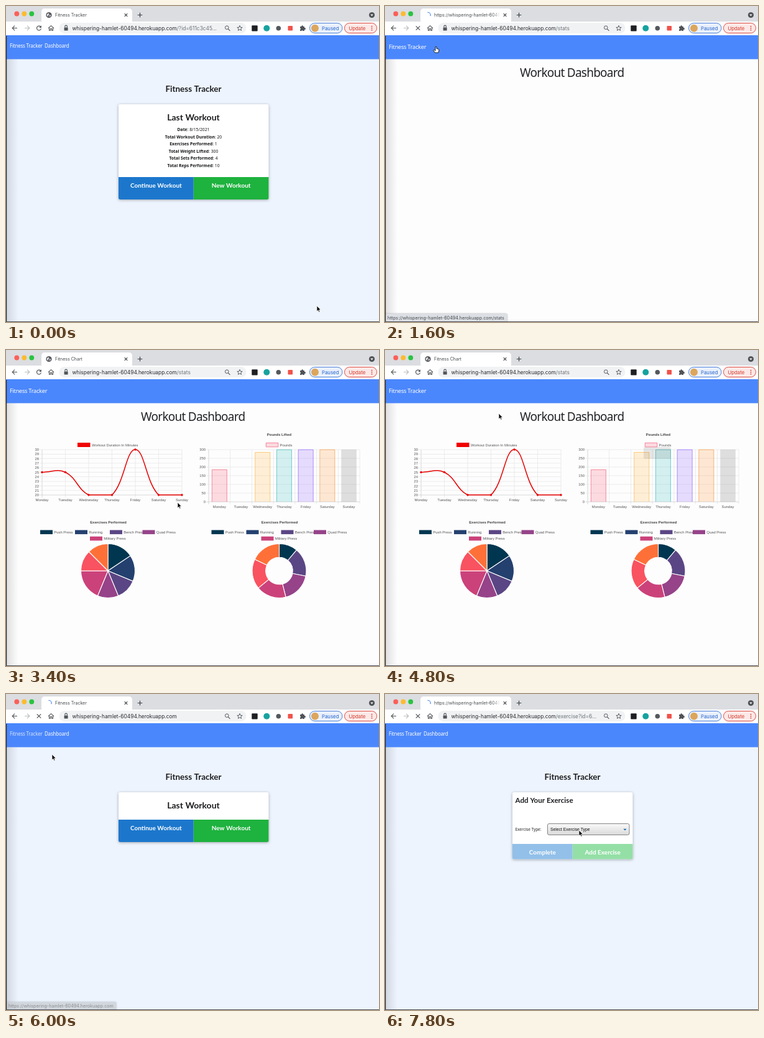
These frames come from a looping animation (600 by 508 pixels, 8000 ms). An HTML page with a canvas:

```html
<!DOCTYPE html>
<html lang="en">
<head>
<meta charset="utf-8">
<title>Fitness Tracker</title>
<style>
html, body { margin: 0; width: 100%; height: 100%; overflow: hidden; background: #fff; }
canvas { display: block; width: 600px; height: 508px; }
</style>
</head>
<body>
<canvas id="stage"></canvas>
<script>
const canvas = document.getElementById('stage');
const ratio = window.devicePixelRatio || 1;
canvas.width = 600 * ratio;
canvas.height = 508 * ratio;
const c = canvas.getContext('2d');
c.scale(ratio, ratio);

const LOOP = 8000, STEP = 200, TAU = Math.PI * 2;
const UI = 'Inter, sans-serif', LATO = 'Lato, sans-serif';
const BODY = '"Noto Sans", sans-serif', CHART = '"Liberation Sans", Arial, sans-serif';
const HOST = 'whispering-hamlet-60494.herokuapp.com';
const DAYS = ['Monday', 'Tuesday', 'Wednesday', 'Thursday', 'Friday', 'Saturday', 'Sunday'];
const MINUTES = [25, 25, 20, 20, 30, 20, 20];
const POUNDS = [185, 0, 285, 300, 300, 300, 300];
const PALETTE = ['#003650', '#24406f', '#5a4684', '#964389', '#cb427a', '#f95260', '#ff7038'];
const BARS = ['245,90,120', '54,162,235', '255,184,70', '60,185,185', '140,95,250', '250,150,60'];

// Cursor stops: time, x, y of the tip.
const PATH = [
  [0, 500, 482], [200, 500, 482], [1000, 85, 66], [1600, 82, 65], [2000, 36, 65], [2400, 36, 65],
  [3400, 276, 245], [3800, 175, 350], [4200, 440, 320], [4500, 440, 172], [4800, 183, 102],
  [5200, 36, 65], [5600, 36, 65], [6000, 74, 97], [6800, 242, 289], [7200, 242, 289], [7800, 312, 219]
];
// Links under the cursor: start, end, path shown in the status bubble.
const LINKS = [[1000, 1800, '/stats'], [2000, 2600, ''], [5200, 5800, ''], [6800, 7400, '/exercise?']];

function text(s, x, y, size, family, color, { align = 'left', weight = 400, spacing = 0 } = {}) {
  c.font = `${weight} ${size}px ${family}`;
  c.letterSpacing = spacing + 'px';
  c.textAlign = align;
  c.fillStyle = color;
  c.fillText(s, x, y + size * 0.36);
  return c.measureText(s).width;
}

function rect(x, y, w, h, color) {
  c.fillStyle = color;
  c.fillRect(x, y, w, h);
}

function box(x, y, w, h, r, fill, stroke, line = 1) {
  c.beginPath();
  c.roundRect(x, y, w, h, r);
  paint(fill, stroke, line);
}

function disc(x, y, r, fill, stroke, line = 1) {
  c.beginPath();
  c.arc(x, y, r, 0, TAU);
  paint(fill, stroke, line);
}

function paint(fill, stroke, line) {
  if (fill) { c.fillStyle = fill; c.fill(); }
  if (stroke) { c.strokeStyle = stroke; c.lineWidth = line; c.stroke(); }
}

function icon(d, x, y, fill, stroke, line = 1.1) {
  c.save();
  c.translate(x, y);
  const p = new Path2D(d);
  if (fill) { c.fillStyle = fill; c.fill(p); }
  if (stroke) { c.strokeStyle = stroke; c.lineWidth = line; c.stroke(p); }
  c.restore();
}

function drawBrowser(s) {
  const ink = '#505357';
  rect(0, 0, 600, 25, '#dbdde1');
  ['#fb5f57', '#fdbb2e', '#29c440'].forEach((color, i) => disc(17.3 + 12 * i, 12.5, 3.9, color));
  box(57, 4, 146, 24, 5, '#fff');
  if (s.loading) {
    c.beginPath();
    c.arc(69, 14.5, 4.2, -1.7, 0.4);
    paint(null, '#3f7ff0', 1.1);
  } else {
    disc(69, 14.5, 4.6, '#54575b');
    icon('M-3 -1.5L-.5 -3L.5 -1L-1 .3L-1 2.8L-3.3 .8Z M1.2 -.2L3.2 .2L1.8 3L.6 1.6Z', 69, 14.5, '#e6e8ea');
  }
  c.save();
  c.beginPath();
  c.rect(79, 5, 106, 20);
  c.clip();
  text(s.title, 79, 14.5, 7, UI, '#44474a');
  const fade = c.createLinearGradient(172, 0, 185, 0);
  fade.addColorStop(0, '#fff0');
  fade.addColorStop(1, '#fff');
  rect(172, 6, 13, 18, fade);
  c.restore();
  icon('M-2.3 -2.3L2.3 2.3M2.3 -2.3L-2.3 2.3', 193, 14.5, null, '#3c4043');
  icon('M-3.8 0H3.8M0 -3.8V3.8', 215.5, 14.5, null, '#3c4043', 1.2);
  disc(588.5, 14.5, 4.6, '#505357');
  icon('M-2.2 -1H2.2L0 1.7Z', 588.5, 14.5, '#fff');

  rect(0, 25, 600, 22, '#fff');
  const arrow = 'M4 0H-3.6M0 -3.8L-3.8 0L0 3.8';
  icon(arrow, 14, 35.5, null, ink);
  icon('M-4 0H3.6M0 -3.8L3.8 0L0 3.8', 34, 35.5, null, '#b9bcc0');
  if (s.loading) icon('M-3.2 -3.2L3.2 3.2M3.2 -3.2L-3.2 3.2', 53, 35.5, null, ink, 1.2);
  else {
    icon('M2.6 -2.3A3.5 3.5 0 1 0 3.4 .9', 53, 35.5, null, ink, 1.2);
    icon('M3.9 -4.2V-.5H.2Z', 53, 35.5, ink);
  }
  icon('M-4.4 .2L0 -3.8L4.4 .2M-3 -.8V3.6H-1V.8H1V3.6H3V-.8', 72.5, 35.5, null, ink);
  box(85.5, 27, 301, 17, 8.5, '#f0f2f4');
  box(93.6, 34.6, 6, 5, 0.7, ink);
  icon('M-1.8 0V-1.7A1.8 1.8 0 0 1 1.8 -1.7V0', 96.6, 34.6, null, ink);
  const w = text(HOST, 106.5, 35.7, 8.4, UI, '#26282b');
  text(s.path, 106.5 + w, 35.7, 8.4, UI, '#6c7074');
  disc(355.3, 34.7, 2.8, null, ink);
  icon('M0 0L3 3', 357.4, 36.8, null, ink, 1.2);
  let star = 'M';
  for (let i = 0; i < 10; i++) {
    const r = i % 2 ? 1.9 : 4.4, a = i * TAU / 10;
    star += `${i ? 'L' : ''}${(r * Math.sin(a)).toFixed(2)} ${(-r * Math.cos(a)).toFixed(2)}`;
  }
  icon(star + 'Z', 376, 35.8, null, ink, 0.9);
  box(395.3, 31.2, 9.4, 9.4, 1, '#1d1f22');
  disc(419.3, 35.7, 5, '#16a3a0');
  disc(438.3, 35.7, 3.8, '#55585c');
  box(453.5, 32, 7.6, 7.6, 1, '#f0524b');
  icon('M-4 -2.6H-1.7A1.4 1.4 0 1 1 1 -2.6H3V-.4A1.4 1.4 0 1 1 3 2.2V4.4H.8A1.4 1.4 0 0 0 -1.8 4.4H-4V2.2A1.4 1.4 0 0 0 -4 -.5Z', 477, 35.7, ink);
  box(488.5, 27.5, 52.5, 16, 8, '#e9f0fd', '#4a7fd8');
  disc(497, 35.7, 6, '#dca65c');
  text('Paused', 508, 35.7, 7.8, UI, '#2563c9');
  box(544.5, 27.5, 52, 16, 8, '#fce9e7', '#dc4a40');
  text('Update', 551.5, 35.7, 7.8, UI, '#d2382d');
  [-3, 0, 3].forEach(d => disc(588.5, 35.7 + d, 0.9, '#d2382d'));
}

function drawNav(s) {
  rect(0, 47, 600, 38.5, '#4b87fc');
  const stats = s.page === 'stats';
  const size = stats ? 9.2 : 8, spacing = stats ? -0.27 : -0.22;
  const y = stats ? 66 : 64;
  text('Fitness Tracker', 6, y, size, BODY, s.dim ? '#d3e2fe' : '#fff', { spacing });
  if (!stats) text('Dashboard', 62, y, size, BODY, '#fff', { spacing });
}

function card(x, y, w, h) {
  c.save();
  c.shadowColor = 'rgba(0,0,0,.32)';
  c.shadowBlur = 4 * ratio;
  c.shadowOffsetY = ratio;
  box(x, y, w, h, 2.5, '#fff');
  c.restore();
}

function buttons(x, y, w, h, colors, labels, labelY) {
  const half = w / 2;
  labels.forEach((label, i) => {
    box(x + half * i, y, half, h, i ? [0, 0, 2.5, 0] : [0, 0, 0, 2.5], colors[i]);
    text(label, x + half * (i + 0.5), labelY, 10, LATO, '#fff', { align: 'center', weight: 700 });
  });
}

const heading = (s, x, y, size, align = 'center') =>
  text(s, x, y, size, LATO, '#1c1d1f', { align, weight: 700 });

function drawHome(s) {
  heading('Fitness Tracker', 301.5, 133, 13.5);
  const bottom = s.summary ? 275 : 202;
  card(181, 158, 241.5, bottom - 122);
  heading('Last Workout', 301.5, 179, 14);
  if (s.summary) {
    const rows = [['Date', '8/15/2021'], ['Total Workout Duration', 20], ['Exercises Performed', 1],
      ['Total Weight Lifted', 300], ['Total Sets Performed', 4], ['Total Reps Performed', 10]];
    rows.forEach(([label, value], i) => {
      const y = 198.7 + 11.5 * i, rest = ': ' + value;
      c.letterSpacing = '0px';
      c.font = `700 6.8px ${BODY}`;
      const wide = c.measureText(label).width;
      c.font = `400 6.8px ${BODY}`;
      const x = 301.5 - (wide + c.measureText(rest).width) / 2;
      text(label, x, y, 6.8, BODY, '#17181a', { weight: 700 });
      text(rest, x + wide, y, 6.8, BODY, '#17181a');
    });
  }
  buttons(181, bottom, 241.5, 36, ['#1c77cc', '#1eb23e'], ['Continue Workout', 'New Workout'], bottom + 13);
}

function drawExercise() {
  heading('Fitness Tracker', 301.5, 133, 13.5);
  card(205, 158, 193.5, 107.5);
  heading('Add Your Exercise', 209.5, 170.5, 11.6, 'left');
  text('Exercise Type:', 209.5, 218, 6.4, BODY, '#222');
  const shade = c.createLinearGradient(0, 208, 0, 227);
  shade.addColorStop(0, '#fafafa');
  shade.addColorStop(1, '#d9d9d9');
  box(261.5, 208.5, 131.5, 18, 2.5, shade, '#858585');
  text('Select Exercise Type', 266, 217.5, 6.8, CHART, '#111');
  icon('M-2.6 -1.2H2.6L0 1.5Z', 386, 218, '#1f6cb4');
  buttons(205, 241, 193.5, 24.5, ['#92c0e9', '#94dfa6'], ['Complete', 'Add Exercise'], 254);
}

const label = (s, x, y, align = 'left', weight = 400) =>
  text(s, x, y, 5.9, CHART, weight > 400 ? '#444' : '#555', { align, weight });

function grid(left, top, right, bottom, cols, rows, low, high) {
  for (let i = 0; i <= cols; i++)
    rect(left + (right - left) * i / cols - 0.3, top, 0.7, bottom - top + 4, i ? '#e4e4e4' : '#c8c8c8');
  for (let i = 0; i <= rows; i++) {
    const y = bottom - (bottom - top) * i / rows;
    rect(left - 4, y - 0.3, right - left + 4, 0.7, i ? '#e4e4e4' : '#c8c8c8');
    label(low + (high - low) * i / rows, left - 5, y, 'right');
  }
}

function lineChart(p) {
  rect(115, 149, 20.5, 7, '#f00000');
  label('Workout Duration In Minutes', 138, 152.7);
  grid(58, 160, 283, 233, 6, 10, 20, 30);
  DAYS.forEach((d, i) => label(d, 58 + 37.5 * i, 241, 'center'));
  const pts = MINUTES.map((v, i) => ({ x: 58 + 37.5 * i, y: 233 - 7.3 * (v - 20) * p }));
  const clampY = y => Math.min(233, Math.max(160, y));
  const knots = pts.map((cur, i) => {
    const prev = pts[i - 1] || cur, next = pts[i + 1] || cur;
    const a = Math.hypot(cur.x - prev.x, cur.y - prev.y), b = Math.hypot(next.x - cur.x, next.y - cur.y);
    const handle = k => [cur.x + k * (next.x - prev.x), clampY(cur.y + k * (next.y - prev.y))];
    return { before: handle(-0.4 * a / (a + b)), after: handle(0.4 * b / (a + b)) };
  });
  c.beginPath();
  c.moveTo(pts[0].x, pts[0].y);
  for (let i = 1; i < pts.length; i++)
    c.bezierCurveTo(...knots[i - 1].after, ...knots[i].before, pts[i].x, pts[i].y);
  paint(null, '#e60000', 1.5);
  pts.forEach(q => disc(q.x, q.y, 1.7, '#e60000'));
}

function barChart(p) {
  label('Pounds Lifted', 439.5, 136.3, 'center', 700);
  box(418.3, 149.3, 19.5, 6.5, 0, `rgba(${BARS[0]},.22)`, `rgb(${BARS[0]})`, 0.7);
  label('Pounds', 440.5, 152.7);
  grid(326, 160, 569, 244, 7, 6, 0, 300);
  DAYS.forEach((d, i) => {
    const x = 326 + 34.7 * (i + 0.5), top = 244 - POUNDS[i] * 0.28 * p;
    label(d, x, 252, 'center');
    if (!POUNDS[i]) return;
    rect(x - 12.3, top, 24.6, 244 - top, BARS[i] ? `rgba(${BARS[i]},.22)` : 'rgba(0,0,0,.12)');
    if (!BARS[i]) return;
    c.beginPath();
    c.moveTo(x - 12, 244);
    c.lineTo(x - 12, top + 0.3);
    c.lineTo(x + 12, top + 0.3);
    c.lineTo(x + 12, 244);
    paint(null, `rgba(${BARS[i]},.8)`, 0.8);
  });
}

function ringChart(cx, values, inner, p) {
  const left = cx - 164;
  label('Exercises Performed', cx + 0.5, 276.5, 'center', 700);
  [['Push Press', 55, 293], ['Running', 111, 293], ['Bench Press', 167, 293],
    ['Quad Press', 219.5, 293], ['Military Press', 135, 303.3]].forEach(([name, x, y], i) => {
    rect(left + x, y - 3.5, 20, 6.6, PALETTE[i]);
    label(name, left + x + 22.3, y);
  });
  const sum = values.reduce((a, b) => a + b);
  let from = -TAU / 4;
  values.forEach((v, i) => {
    const to = from + v / sum * TAU * p;
    if (v) {
      c.beginPath();
      c.arc(cx, 355, 43.5, from, to);
      c.arc(cx, 355, inner, to, from, true);
      c.closePath();
      paint(PALETTE[i], '#fff', 1.1);
    }
    from = to;
  });
}

function drawStats(t) {
  text('Workout Dashboard', 217, 107, 19, BODY, '#212225', { spacing: -0.75 });
  if (t < 1800) return;
  const k = Math.min(1, (t - 1780) / 1000);
  const p = 1 - (1 - k) ** 4;
  lineChart(p);
  barChart(p);
  ringChart(164, MINUTES, 0, p);
  ringChart(439.5, POUNDS, 21.8, p);
  if (t >= 4600 && t < 5000) box(416, 156, 44, 19, 2, 'rgba(0,0,0,.09)');
}

function drawStatus(path, alpha) {
  c.save();
  const url = 'https://' + HOST + path;
  c.font = `400 7.2px ${UI}`;
  c.letterSpacing = '0px';
  const w = c.measureText(url).width + 9;
  c.globalAlpha = alpha;
  c.shadowColor = 'rgba(0,0,0,.3)';
  c.shadowBlur = 2 * ratio;
  box(0, 494.5, w, 15, [0, 3, 0, 0], '#dcdfe4');
  c.shadowColor = 'transparent';
  text(url, 4, 501.3, 7.2, UI, '#45484c');
  c.restore();
}

function drawCursor(t, hand) {
  let i = 1;
  while (i < PATH.length - 1 && PATH[i][0] < t) i++;
  const [t0, x0, y0] = PATH[i - 1], [t1, x1, y1] = PATH[i];
  const k = Math.min(1, (t - t0) / (t1 - t0)), e = k * k * (3 - 2 * k);
  const x = x0 + (x1 - x0) * e, y = y0 + (y1 - y0) * e;
  if (hand) icon('M-1 .8Q0 -.6 1 .8V3.6L4 4.2Q5 4.5 4.8 6L4 10H-1.6L-4 6.6Q-4 5.2 -2.7 5.6L-1 7Z', x, y, '#fff', '#111', 0.9);
  else icon('M0 0V9L2.1 7.2L3.5 10.3L5 9.6L3.6 6.6L6.3 6.4Z', x, y, '#0a0a0a', '#fff', 0.7);
}

function sceneAt(t) {
  if (t < 1600) return { page: 'home', summary: true, title: 'Fitness Tracker', path: '/?id=611c3c45...', loading: t >= 1400 };
  if (t < 5600) return { page: 'stats', title: t < 1800 ? 'https://' + HOST : 'Fitness Chart', path: '/stats',
    loading: t < 1800, dim: t >= 2000 && t < 2600 || t >= 5200 };
  if (t < 7400) return { page: 'home', summary: t >= 6200, title: 'Fitness Tracker',
    path: t < 6200 ? '' : '/?id=611c3c45...', loading: t < 6200, dim: t < 6200 };
  return { page: 'exercise', title: 'https://' + HOST, path: '/exercise?id=6...', loading: true };
}

function draw(t) {
  const s = sceneAt(t);
  rect(0, 0, 600, 508, s.page === 'stats' ? '#fdfdfe' : '#edf4fe');
  const edge = c.createLinearGradient(0, 0, 20, 0);
  edge.addColorStop(0, 'rgba(0,0,0,.12)');
  edge.addColorStop(1, 'rgba(0,0,0,0)');
  rect(0, 85, 20, 423, edge);
  drawBrowser(s);
  drawNav(s);
  if (s.page === 'home') drawHome(s);
  else if (s.page === 'stats') drawStats(t);
  else drawExercise();
  const link = LINKS.find(([from, to]) => t >= from && t < to);
  if (link) drawStatus(link[2], 1);
  else if (t >= 5800 && t < 6200) drawStatus('', 0.5);
  rect(0, 48, 1.2, 460, '#25282d');
  rect(0, 507, 600, 1, '#4c5056');
  drawCursor(t, !!link);
}

let shown = -1;
const start = performance.now();
function tick() {
  const t = Math.floor((performance.now() - start) % LOOP / STEP) * STEP;
  if (t !== shown) draw(shown = t);
  requestAnimationFrame(tick);
}
tick();
</script>
</body>
</html>
```
